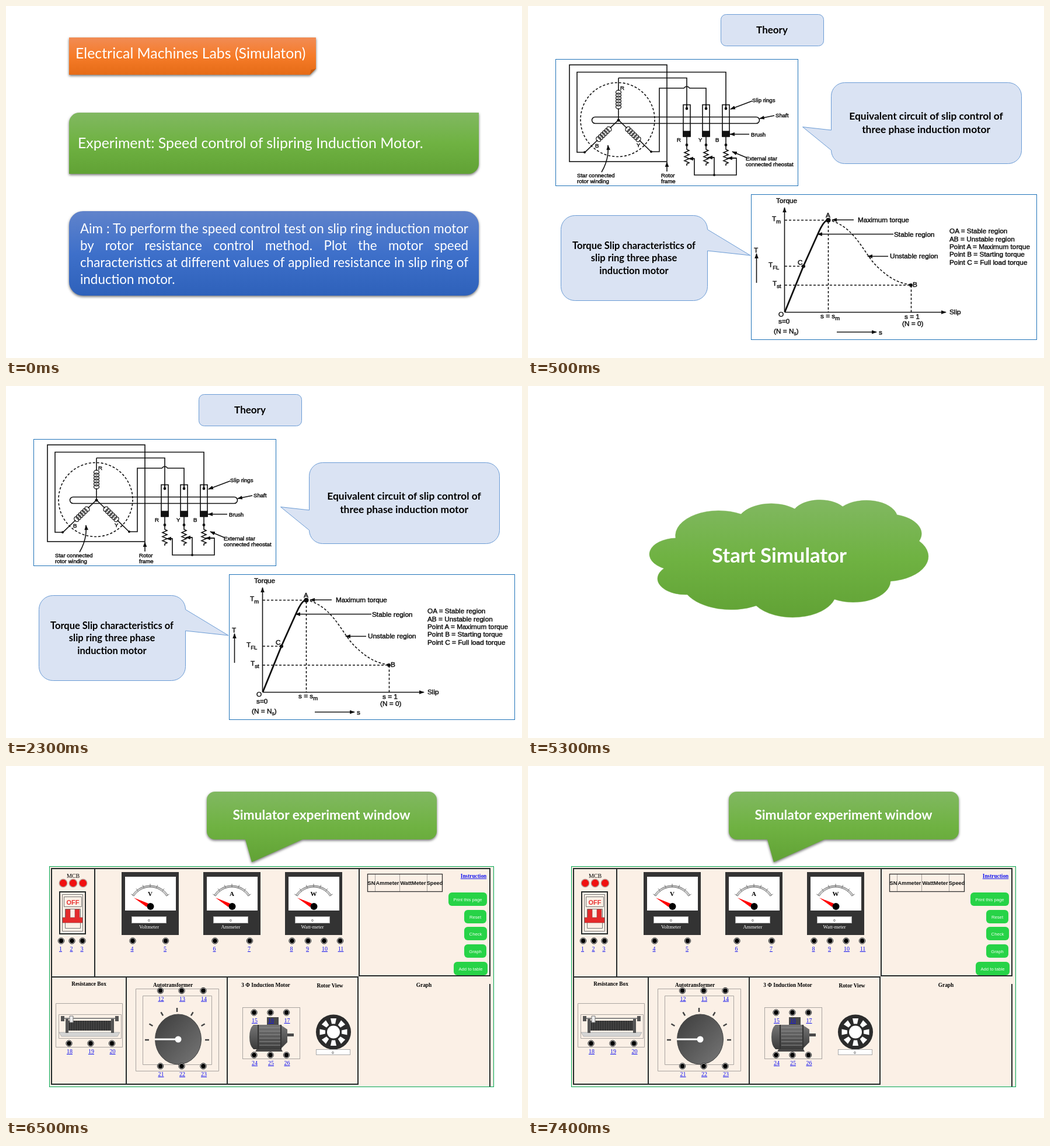
These frames come from a looping animation (884 px wide and 604 px high, 8 s). An HTML page:

```html
<!DOCTYPE html>
<html lang="en">
<head>
<meta charset="utf-8">
<title>Slip ring induction motor lab</title>
<style>
html, body { margin: 0; width: 100%; height: 100%; overflow: hidden; background: #fff; }
svg { display: block; width: 884px; height: 604px; }
.lato { font-family: Lato, sans-serif; fill: #fff; }
.bold { font-weight: 700; }
.mid { text-anchor: middle; }
.shadow { filter: drop-shadow(0 2px 2px rgba(0, 0, 0, .55)); }
.note { fill: #dae3f3; stroke: #6a9bd5; }
.frame { fill: #fff; stroke: #1f72b8; }
.ink { fill: none; stroke: #111; stroke-width: 1.6; }
.dash { stroke-dasharray: 4 3; }
.arrow { marker-end: url(#head); }
.sans { font-family: "Liberation Sans", Arial, sans-serif; fill: #111; }
.print { stroke: #111; stroke-width: .45; }
.serif { font-family: "Liberation Serif", Times, serif; font-size: 9.3px; }
.link { fill: #11e; text-decoration: underline; }
.wall { fill: none; stroke: #252b2b; stroke-width: 2; }
.thin { fill: none; stroke: #a9a4a0; }
.aim { font: 22.4px/29px Lato, sans-serif; color: #fff; }
.aim div { text-align-last: justify; white-space: nowrap; }
.aim div:last-child { text-align-last: left; }
</style>
</head>
<body>
<svg viewBox="0 0 884 604">
<defs>
  <linearGradient id="orange" x2="0" y2="1"><stop stop-color="#f18c55"/><stop offset=".5" stop-color="#f67b28"/><stop offset="1" stop-color="#e56b17"/></linearGradient>
  <linearGradient id="green" x2="0" y2="1"><stop stop-color="#81b861"/><stop offset=".5" stop-color="#6fb242"/><stop offset="1" stop-color="#61a235"/></linearGradient>
  <linearGradient id="blue" x2="0" y2="1"><stop stop-color="#6083cb"/><stop offset=".5" stop-color="#3e70ca"/><stop offset="1" stop-color="#2e61ba"/></linearGradient>
  <linearGradient id="steel" x2="0" y2="1"><stop stop-color="#777"/><stop offset="1" stop-color="#3a3a3a"/></linearGradient>
  <linearGradient id="knob" x2="1" y2="1"><stop stop-color="#3c3c3c"/><stop offset="1" stop-color="#777"/></linearGradient>
  <marker id="head" markerUnits="userSpaceOnUse" markerWidth="9" markerHeight="8" refX="8" refY="4" orient="auto"><path d="M0 .7L9 4 0 7.3z" fill="#111"/></marker>
</defs>

<g class="slide">
  <g class="shadow">
    <path d="M108 54H531V107.500L520.500 118H108z" fill="url(#orange)"/>
    <path d="M520.500 118L522.500 109.500 531 107.500z" fill="#c55a11"/>
  </g>
  <path class="shadow" d="M125.500 183H810V270.500A17.500 17.500 0 0 1 792.500 288H108V200.500A17.500 17.500 0 0 1 125.500 183z" fill="url(#green)"/>
  <rect class="shadow" x="108" y="352" width="702" height="145" rx="24" fill="url(#blue)"/>
  <g class="lato" font-size="24.900">
    <text x="119" y="90">Electrical Machines Labs (Simulaton)</text>
    <text x="123" y="244">Experiment: Speed control of slipring Induction Motor.</text>
  </g>
  <foreignObject x="127" y="367" width="665" height="120">
    <div class="aim">
      <div>Aim : To perform the speed control test on slip ring induction motor</div>
      <div>by rotor resistance control method. Plot the motor speed</div>
      <div>characteristics at different values of applied resistance in slip ring of</div>
      <div>induction motor.</div>
    </div>
  </foreignObject>
</g>

<g class="slide">
  <rect class="note" x="330.500" y="14.500" width="176" height="54" rx="9"/>
  <path class="note" d="M542.500 131.500H822.500A23 23 0 0 1 845.500 154.500V247.500A23 23 0 0 1 822.500 270.500H542.500A23 23 0 0 1 519.500 247.500L470.500 207.500 519.500 213V154.500A23 23 0 0 1 542.500 131.500z"/>
  <path class="note" d="M80.500 359.500H283.500A24 24 0 0 1 307.500 383.500L381 428 307.500 420V481.500A24 24 0 0 1 283.500 505.500H80.500A24 24 0 0 1 56.500 481.500V383.500A24 24 0 0 1 80.500 359.500z"/>
  <g class="lato bold mid" style="fill:#000">
    <text x="418" y="47" font-size="17">Theory</text>
    <g font-size="17.400"><text x="682" y="195">Equivalent circuit of slip control of</text><text x="682" y="218">three phase induction motor</text></g>
    <g font-size="16.500"><text x="181.500" y="417">Torque Slip characteristics of</text><text x="181.500" y="438">slip ring three phase</text><text x="181.500" y="460">induction motor</text></g>
  </g>

  <rect class="frame" x="47.500" y="91.500" width="415" height="217"/>
  <g class="ink">
    <rect x="71" y="101" width="167" height="166"/>
    <circle class="dash" cx="153.500" cy="195" r="63.500"/>
    <rect x="109.500" y="190.500" width="287" height="11" rx="5.500"/>
    <path d="M97 251H84V113.500H339V176M155 123.500H272V176M211 250H225V141H267Q272 135 277 141H305V176"/>
    <path d="M278 262H285V290H357V261H350M311 260H319V290"/>
    <path class="arrow" d="M285 262H275"/><path class="arrow" d="M319 260H308"/><path class="arrow" d="M357 261H342"/>
    <path class="arrow" d="M238 284V268"/><path class="arrow" d="M126 285Q139 263 137 239"/>
    <path class="arrow" d="M384 163L347 177"/><path class="arrow" d="M422 188L397 193"/>
    <path class="arrow" d="M379 220H346"/><path class="arrow" d="M374 260L350 250"/>
    <g id="circuit"></g>
  </g>
  <g fill="#111"><circle cx="155" cy="196" r="2.500"/><circle cx="97" cy="251" r="2"/><circle cx="211" cy="250" r="2"/><circle cx="319" cy="290" r="2"/></g>
  <g class="sans print" font-size="9.600">
    <text x="158" y="144">R</text><text x="115" y="243">B</text><text x="186" y="242">Y</text>
    <text x="255" y="233">R</text><text x="292" y="233">Y</text><text x="321" y="233">B</text>
    <text x="384" y="165">Slip rings</text><text x="424" y="191">Shaft</text><text x="382" y="224">Brush</text>
    <text x="373" y="265">External star</text><text x="373" y="275">connected rheostat</text>
    <text x="84" y="294">Star connected</text><text x="84" y="304">rotor winding</text>
    <text x="228" y="294">Rotor</text><text x="228" y="304">frame</text>
  </g>

  <rect class="frame" x="382.500" y="323.500" width="489" height="249"/>
  <g class="ink">
    <path class="arrow" d="M439.500 525V346"/><path class="arrow" d="M439.500 525.500H716"/>
    <path class="dash" d="M440 367.500H514.500V525M440 446.500H472M440 479H656.500V525"/>
    <path class="dash" d="M514 367C560 377 575 425 598 447S636 476 656 478"/>
    <path d="M440 525L472 446 498 388Q507 368 514 367" stroke-width="2.800"/>
    <path class="arrow" d="M558 367H521"/><path class="arrow" d="M626 391.500H496"/><path class="arrow" d="M617 429.500H582"/>
    <path class="arrow" d="M391.500 475V425"/><path class="arrow" d="M529 559.500H597"/>
  </g>
  <g fill="#111"><circle cx="514.500" cy="367.500" r="4"/><circle cx="656" cy="479" r="3"/><circle cx="472" cy="446.500" r="3"/></g>
  <g class="sans print" font-size="11.800">
    <text x="425" y="338">Torque</text><text x="510" y="363">A</text><text x="462" y="444">C</text><text x="659" y="482">B</text>
    <text x="418" y="369">T<tspan dy="4" font-size="9.500">m</tspan></text>
    <text x="412" y="448">T<tspan dy="4" font-size="9.500">FL</tspan></text>
    <text x="419" y="480">T<tspan dy="4" font-size="9.500">st</tspan></text>
    <text x="387" y="423">T</text><text x="429" y="533">O</text><text x="429" y="545">s=0</text>
    <text x="421" y="562">(N = N<tspan dy="3" font-size="8.500">s</tspan><tspan dy="-3">)</tspan></text>
    <text x="501" y="536">s = s<tspan dy="3" font-size="9.500">m</tspan></text>
    <text x="645" y="537">s = 1</text><text x="641" y="549">(N = 0)</text><text x="601" y="564">s</text><text x="722" y="529">Slip</text>
    <text x="565" y="371">Maximum torque</text><text x="627" y="396">Stable region</text><text x="620" y="433">Unstable region</text>
    <text x="722" y="390">OA = Stable region</text><text x="722" y="404">AB = Unstable region</text>
    <text x="722" y="417">Point A = Maximum torque</text><text x="722" y="430">Point B = Starting torque</text><text x="722" y="444">Point C = Full load torque</text>
  </g>
</g>

<g class="slide">
  <path fill="url(#green)" stroke="#70ad47" stroke-width=".5" d="M253 261A74.300 42.800 0 0 1 365 220A58.600 33.800 0 0 1 457 211A48 27.700 0 0 1 539 207A53.400 30.700 0 0 1 632 221A58.600 33.800 0 0 1 670 266A74.500 42.900 0 0 1 621 335A63.600 36.600 0 0 1 525 366A74.200 42.900 0 0 1 391 377A84.900 49 0 0 1 273 358A48 27.500 0 0 1 233 313A47.800 27.700 0 0 1 253 261z"/>
  <text class="lato bold mid" x="430.500" y="303" font-size="34.700">Start Simulator</text>
</g>

<g class="slide">
  <path class="shadow" fill="url(#green)" d="M358 44H724A14 14 0 0 1 738 58V112A14 14 0 0 1 724 126H508L421 165 410 126H358A14 14 0 0 1 344 112V58A14 14 0 0 1 358 44z"/>
  <text class="lato bold mid" x="540.500" y="92" font-size="22.800">Simulator experiment window</text>
  <rect x="74.500" y="172.500" width="761" height="378" fill="#fbf0e6" stroke="#00a650"/>
  <path class="wall" d="M77 176H829V360H605V176M78 176V546H603V362H78M152 177V361M206 362V546M379 362V546M829 374V550"/>

  <g class="serif mid">
    <text x="115" y="192" font-size="10">MCB</text>
    <g class="bold"><text x="142" y="377">Resistance Box</text><text x="286" y="379">Autotransformer</text><text x="445" y="379">3 Φ Induction Motor</text><text x="555" y="380">Rotor View</text><text x="716" y="379">Graph</text><text class="link" x="801" y="192">Instruction</text></g>
  </g>

  <g fill="#f01010" stroke="#b8a09a" stroke-width="1.300"><circle cx="98" cy="201" r="6.800"/><circle cx="115" cy="201" r="6.800"/><circle cx="132" cy="201" r="6.800"/></g>
  <rect class="wall" x="92" y="216" width="44" height="72"/>
  <path class="thin" style="stroke:#777" d="M96.500 220.500H131.500V283.500H96.500zM99.500 224.500H129.500V241.500H99.500zM101.500 245.500H127.500V278.500H101.500z"/>
  <text class="sans bold mid" x="114.500" y="237.500" font-size="11" style="fill:#e83232">OFF</text>
  <path d="M102 246H110V260H118V246H126V260H131V269H97V260H102z" fill="#e52b2b" stroke="#844" stroke-width=".6"/>

  <g id="meters"></g>

  <path class="thin" d="M85.500 407.500H199.500V482.500H85.500zM90.500 426.500H197.500V467.500H90.500z"/>
  <path d="M91 457H195L191 464H95z" fill="#d4d4d4" stroke="#999" stroke-width=".6"/>
  <path d="M95 433H191" stroke="#888" stroke-width="2"/>
  <path d="M94 429h6v9h-6zM187 429h6v9h-6zM102 434h5v24h-5zM180 434h5v24h-5z" fill="#555"/>
  <rect x="107" y="437" width="73" height="17" fill="#2c2c2c"/>
  <path d="M107 445.500H180" stroke="#5a5a5a" stroke-width="17" stroke-dasharray="1 2"/>
  <path d="M109 429h6v11h-6z" fill="#eee" stroke="#777"/>

  <path class="thin" d="M222.500 382.500H364.500V523.500H222.500zM234.500 394.500H352.500V512.500H234.500z"/>
  <ellipse cx="295" cy="469" rx="39.500" ry="43" fill="url(#knob)" stroke="#444"/>
  <path id="knobTicks" stroke="#444" stroke-width="2.500"/>
  <path d="M255 469H295" stroke="#fff" stroke-width="3"/><circle cx="295" cy="469" r="5.500" fill="#fff"/>

  <rect class="thin" x="405.500" y="414.500" width="98" height="88"/>
  <path d="M478 459H493V464H478zM447 431H467V446H447zM431 483H470L474 490H427z" fill="#4a4a4a"/>
  <path d="M424 444H470L482 452V474L470 486H424Q417 480 417 465T424 444z" fill="url(#steel)"/>
  <path d="M434 449H470M434 455H470M434 461H470M434 467H470M434 473H470M434 479H470" stroke="#909090"/>
  <path d="M432 444V486M471 444V486" stroke="#333" stroke-width="2"/>

  <circle cx="561" cy="456.500" r="30" fill="#2b2b2b"/><circle cx="561" cy="456.500" r="11" fill="#fff"/>
  <g id="slots" fill="#fff"></g>
  <rect x="531.500" y="486.500" width="58" height="9" fill="#fff" stroke="#aaa"/>
  <text class="sans mid" x="560" y="493.500" font-size="6">0</text>

  <path class="thin" d="M632.500 186V216M674.500 186V216M721.500 186V216"/>
  <rect x="619.500" y="185.500" width="128" height="30" fill="none" stroke="#333" stroke-width="1.300"/>
  <g class="sans bold mid" font-size="9.200"><text x="626" y="204">SN</text><text x="653.500" y="204">Ammeter</text><text x="697.500" y="204">WattMeter</text><text x="734.500" y="204">Speed</text></g>
  <g id="buttons"></g>
  <g id="terminals"></g>
</g>
</svg>

<script>
const $ = id => document.getElementById(id);
const repeat = (n, make) => Array.from({ length: n }, (_, i) => make(i)).join('');
const polar = (cx, cy, r, deg) => {
  const a = deg * Math.PI / 180;
  return `${(cx + r * Math.cos(a)).toFixed(1)} ${(cy + r * Math.sin(a)).toFixed(1)}`;
};
const ticks = (cx, cy, r1, r2, from, step, n) =>
  repeat(n, i => `M${polar(cx, cy, r1, from + i * step)}L${polar(cx, cy, r2, from + i * step)}`);

// Rotor windings, then slip rings with their rheostats
const coil = (angle, end) => `<g transform="translate(155 195.500) rotate(${angle})">
  <path d="M0 0V-20M0 -50V${-end}"/>${repeat(6, i => `<ellipse cy="${-22.5 - i * 5}" rx="4.500" ry="3.600" stroke-width="1.300"/>`)}</g>`;
const ring = x => `<g transform="translate(${x} 0)">
  <rect x="-6" y="169.500" width="12" height="54"/><path d="M0 168V176M0 224V246l4 2${repeat(3, () => 'l-8 3.500 8 3.500')}l-4 2v3"/>
  <path d="M-6 215H6V224H-6z" fill="#111"/><circle cy="176" r="1.600" fill="#111"/><circle cy="238.500" r="1.600" fill="#111"/></g>`;
$('circuit').innerHTML = coil(0, 72) + coil(-134, 80) + coil(134.3, 78) + [272, 305, 339].map(ring).join('');

const meter = ([letter, name], i) => `<g transform="translate(${198 + i * 140} 182)">
  <rect width="98" height="108" fill="#333"/><rect x="6" y="8" width="87" height="58" fill="#fff"/>
  <path d="M${polar(49, 59, 33, 213)}A33 33 0 0 1 ${polar(49, 59, 33, 327)}M${polar(49, 59, 36, 213)}A36 36 0 0 1 ${polar(49, 59, 36, 327)}
    ${ticks(49, 59, 33, 36, 213, 3.8, 31)}${ticks(49, 59, 33, 39, 213, 19, 7)}" fill="none" stroke="#444" stroke-width=".7"/>
  <text class="serif bold mid" x="49" y="41" style="font-size:11px">${letter}</text>
  <path d="M21 44L46 54 43 60z" fill="#f00"/><circle cx="49.500" cy="59" r="6" fill="#000"/>
  <rect x="17.500" y="76.500" width="59" height="11" fill="#fff" stroke="#aaa"/>
  <text class="sans mid" x="47" y="84.500" font-size="6">0</text>
  <text class="serif mid" x="47" y="97" fill="#fff" style="font-size:8.700px">${name}</text></g>`;
$('meters').innerHTML = [['V', 'Voltmeter'], ['A', 'Ammeter'], ['W', 'Watt-meter']].map(meter).join('');

$('knobTicks').setAttribute('d', ticks(293, 470, 48, 55, 180, 30, 7));
$('slots').innerHTML = repeat(8, i => `<path transform="translate(561 456.500) rotate(${i * 45})" d="M-3 -14L-5 -23.500H5L3 -14z"/>`);

const buttons = [[758, 66, 'Print this page'], [785, 38, 'Reset'], [785, 39, 'Check'], [785, 38, 'Graph'], [767, 58, 'Add to table']];
$('buttons').innerHTML = buttons.map(([x, w, label], i) => {
  const y = Math.round(217 + i * 29.7);
  return `<rect x="${x}" y="${y}" width="${w}" height="23" rx="6" fill="#27d347"/>
    <text class="sans mid" x="${x + w / 2}" y="${y + 14.5}" font-size="7.700" style="fill:#f2fff2">${label}</text>`;
}).join('');

// First label, y, then the x of each terminal
const rows = [
  [1, 300, 94.5, 113, 131], [4, 300, 217, 273.5], [6, 300, 358, 417.5], [8, 300, 490, 517.5, 545, 572.5],
  [12, 385.5, 264.5, 301, 338], [15, 423, 425, 453, 480.5], [18, 476, 108, 145, 181.5],
  [21, 515, 264.5, 301, 338], [24, 496, 425, 453, 480.5],
];
$('terminals').innerHTML = rows.map(([first, y, ...xs]) => xs.map((x, i) =>
  `<circle cx="${x}" cy="${y}" r="5.200" fill="#fff" stroke="#222"/><circle cx="${x}" cy="${y}" r="3.900"/>
   <text class="serif link mid" x="${x + (first + i > 9 ? 1 : -1)}" y="${y + 17}" style="font-size:10px">${first + i}</text>`).join('')).join('');

const slides = [...document.querySelectorAll('.slide')];
const starts = [0, 500, 3500, 6500];
const LOOP = 8000;
const t0 = performance.now();
function draw() {
  const t = (performance.now() - t0) % LOOP;
  const current = starts.filter(s => s <= t).length - 1;
  slides.forEach((slide, i) => { slide.style.display = i === current ? '' : 'none'; });
  requestAnimationFrame(draw);
}
draw();
</script>
</body>
</html>
```
